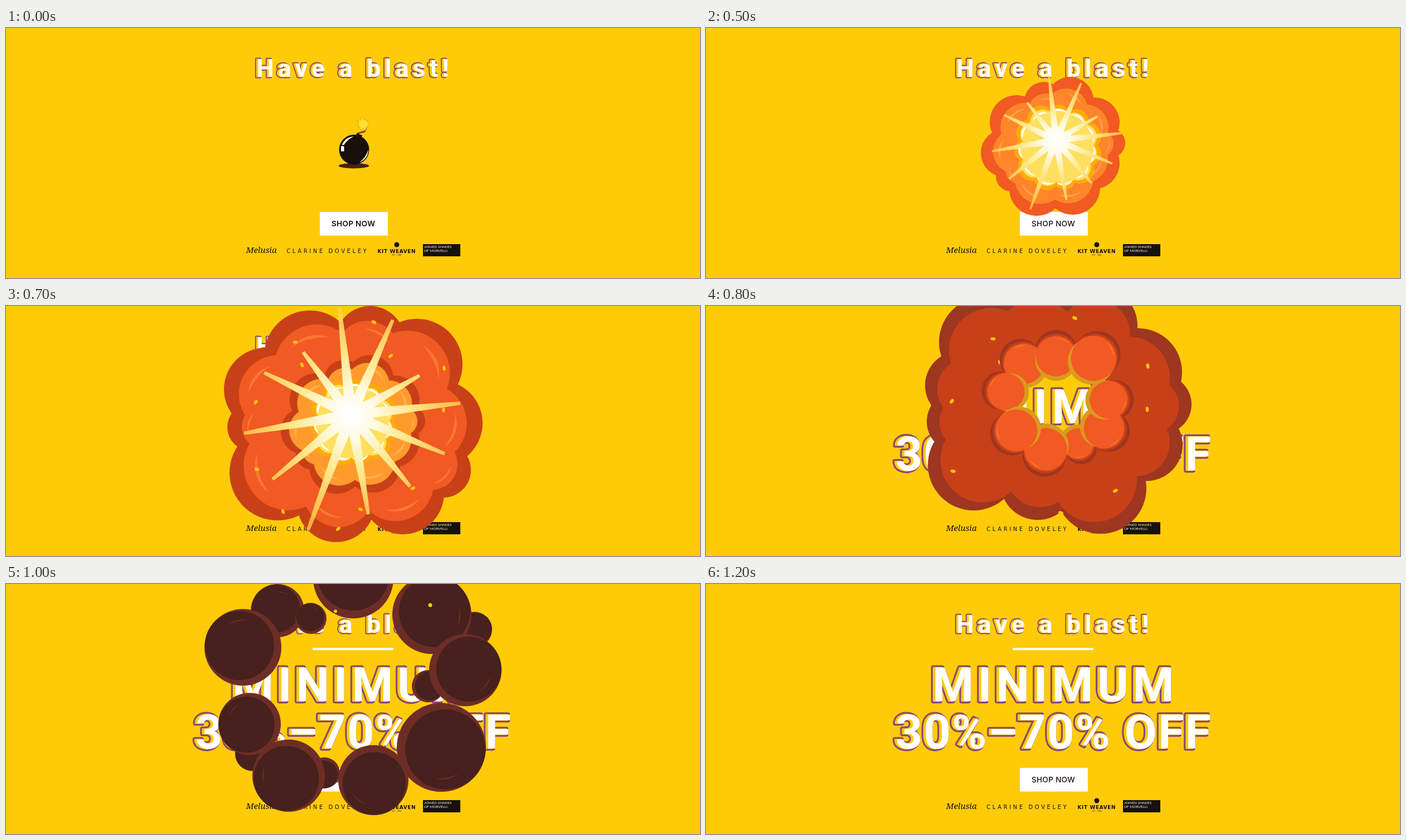
Animation, 1245 px wide and 450 px high, one loop 5200 ms. Source, as an HTML page with a canvas:

```html
<!DOCTYPE html>
<html lang="en">
<head>
<meta charset="utf-8">
<title>Have a blast!</title>
<style>
html, body { margin: 0; width: 100%; height: 100%; overflow: hidden; background: #ffcb08; }
canvas { display: block; }
</style>
</head>
<body>
<canvas id="stage" width="1245" height="450"></canvas>
<script>
const ctx = document.getElementById('stage').getContext('2d');
const YELLOW = '#ffcb08', INK = '#17100b', PURPLE = '#8b4a70';
const SOOT = '#46211d', BROWN = '#6d2d26', RUST = '#9e3620', RED = '#c84018';
const ORANGE = '#f15a22', AMBER = '#ff852a', GOLD = '#d99b1e';
const CX = 622, CY = 212, TAU = Math.PI * 2;

// Lobes as [x, y, radius]
const smallCloud = [
  [557, 169, 48], [606, 132, 35], [653, 130, 42], [697, 170, 45], [725, 207, 27],
  [695, 243, 47], [658, 287, 49], [593, 289, 49], [547, 267, 27], [536, 225, 43]];
const bigCloud = [
  [545, 90, 82], [653, 62, 62], [737, 105, 82], [778, 211, 77], [784, 295, 50],
  [712, 337, 74], [592, 355, 70], [487, 300, 86], [440, 218, 43], [466, 150, 75]];
const smokeCloud = [
  [500, 65, 82], [455, 143, 62], [450, 208, 54], [480, 286, 82], [595, 318, 67], [708, 328, 82],
  [790, 250, 65], [818, 177, 53], [775, 119, 79], [705, 35, 69], [590, 55, 90]];
const fireRing = [
  [557, 88, 50], [628, 72, 50], [677, 265, 38], [735, 232, 50], [712, 75, 56],
  [745, 168, 47], [517, 150, 46], [605, 278, 53], [540, 236, 52]];
const puffs = [
  [487, 48, 48], [425, 114, 69], [547, 62, 28], [623, -10, 72], [840, 82, 32], [764, 55, 71],
  [757, 184, 29], [824, 155, 65], [781, 294, 80], [659, 353, 63], [571, 340, 28],
  [443, 305, 32], [507, 345, 65], [437, 252, 56]];
const rays = [
  [-21, -194], [75, -171], [196, -21], [-192, 33], [-77, 207], [31, 179],
  [106, 129], [-156, -76], [-86, -113], [123, -71], [168, 70], [-141, 116]];
const embers = [
  [519, 65], [531, 106], [448, 173], [450, 294], [497, 370], [596, 401],
  [636, 366], [786, 112], [690, 90], [660, 29], [785, 187], [730, 328]];

function ellipse(x, y, rx, ry, color, turn = 0) {
  ctx.fillStyle = color;
  ctx.beginPath();
  ctx.ellipse(x, y, rx, ry, turn, 0, TAU);
  ctx.fill();
}
const disc = (x, y, r, color) => ellipse(x, y, r, r, color);

function crescent(x, y, r, angle, spread, color) {
  const at = (a, d) => [x + Math.cos(a) * d, y + Math.sin(a) * d];
  ctx.fillStyle = color;
  ctx.beginPath();
  ctx.arc(x, y, r, angle - spread, angle + spread);
  ctx.quadraticCurveTo(...at(angle, r), ...at(angle - spread, r));
  ctx.fill();
}

function scaled(k, x, y, draw) {
  ctx.save();
  ctx.translate(x, y);
  ctx.scale(k, k);
  ctx.translate(-x, -y);
  draw();
  ctx.restore();
}

function label(text, x, y, font, color, spacing = 0, align = 'center') {
  ctx.font = font;
  ctx.letterSpacing = spacing + 'px';
  ctx.textAlign = align;
  ctx.fillStyle = color;
  ctx.fillText(text, x + (align === 'center' ? spacing / 2 : 0), y);
}

// White lettering over an outlined copy set to its left
function headline(text, x, y, size, spacing, shift, outer, inner) {
  const font = `700 ${size}px Roboto, sans-serif`;
  label(text, x, y, font, YELLOW, spacing);
  ctx.lineJoin = 'round';
  for (const [color, width] of [[PURPLE, outer], [YELLOW, inner]]) {
    ctx.strokeStyle = color;
    ctx.lineWidth = width;
    ctx.strokeText(text, x + spacing / 2 - shift, y);
  }
  label(text, x - shift, y, font, YELLOW, spacing);
  label(text, x, y, font, '#fff', spacing);
}

function page(frame) {
  ctx.fillStyle = YELLOW;
  ctx.fillRect(0, 0, 1245, 450);
  headline('Have a blast!', 622, 88, 44, 7.5, 3, 5, 1.2);
  ctx.fillStyle = '#fff';
  ctx.fillRect(563, 331, 122, 42.5);
  if (frame > 7) {
    ctx.fillRect(550, 115, 145, 4);
    headline('MINIMUM', 623, 211, 84.5, 7.8, 4, 8, 1.5);
    headline('30%–70% OFF', 623, 296, 84.5, 2.2, 4, 8, 1.5);
  }
  label('SHOP NOW', 623, 357, `${frame ? 500 : 600} 13.6px Inter, sans-serif`, INK, 0.3);
  label('Melusia', 458, 405, 'italic 15px "Noto Serif", serif', INK);
  label('CLARINE DOVELEY', 575, 405, '10px "DejaVu Sans", sans-serif', INK, 3.6);
  disc(701, 390, 4.5, INK);
  label('KIT WEAVEN', 700.5, 404.5, 'bold 9px "DejaVu Sans", sans-serif', INK, 0.6);
  label('EST · 1984', 701, 410, '3px Inter, sans-serif', INK, 0.2);
  ctx.fillStyle = INK;
  ctx.fillRect(748, 389, 67, 22);
  label('JOINED SHADES', 750, 396, '6.4px Lato, sans-serif', '#fff', 0, 'left');
  label('OF MORVELLI.', 750, 402.5, '6.4px Lato, sans-serif', '#fff', 0, 'left');
}

function star(x, y, r, turn, color) {
  ctx.fillStyle = color;
  ctx.beginPath();
  for (let i = 0; i < 20; i++) {
    const a = turn + i * TAU / 20, d = r * (i % 2 ? 0.6 : 0.84 + 0.16 * Math.sin(i * 2.3));
    ctx.lineTo(x + Math.cos(a) * d, y + Math.sin(a) * d);
  }
  ctx.fill();
}

function bomb(frame) {
  const sx = 641 + frame * 0.7, sy = 173 + frame * 3.7;
  ellipse(624, 248, 27.5, 4.7, SOOT);
  ctx.lineWidth = 3;
  ctx.strokeStyle = '#76502f';
  ctx.beginPath();
  ctx.moveTo(629, 194);
  ctx.bezierCurveTo(630, 184, sx + 6, 192, sx + 4, sy + 7);
  ctx.stroke();
  disc(624.5, 219, 27, INK);
  ctx.save();
  ctx.translate(633, 195);
  ctx.rotate(0.4);
  ctx.fillRect(-5, -4, 10, 9);
  ctx.restore();
  crescent(625, 219, 24, 3.85, 0.82, '#fff');
  ctx.fillStyle = '#fff';
  ctx.fillRect(601, 213, 5.5, 9);
  ctx.fillStyle = INK;
  ctx.fillRect(600, 210.5, 9, 2);
  crescent(625, 219, 25, 0.6, 0.6, '#fff');
  star(sx, sy, 15, frame * 1.3, '#ff9d1e');
  star(sx, sy, 13, frame * 1.3 + 0.05, '#ffe12f');
}

function cloud(lobes, core, dark, light, glow, shift) {
  disc(CX, CY, core, dark);
  for (const [x, y, r] of lobes) disc(x, y, r, dark);
  disc(CX, CY, core, light);
  const inner = lobes.map(([x, y, r]) => {
    const a = Math.atan2(y - CY, x - CX);
    return [x - Math.cos(a) * shift, y - Math.sin(a) * shift, r * 0.93, a];
  });
  for (const [x, y, r] of inner) disc(x, y, r, light);
  if (glow) for (const [x, y, r, a] of inner) crescent(x, y, r * 0.75, a + 0.3, 0.65, glow);
}

function core(x, y) {
  const ring = (radius, r, color) => {
    disc(x, y, radius + 5, color);
    for (let i = 0; i < 11; i++) {
      const a = i * TAU / 11 + 0.2;
      disc(x + Math.cos(a) * radius, y + Math.sin(a) * radius, r + 3 * Math.sin(i * 2.1), color);
    }
  };
  ring(57, 23, '#ffab08');
  ring(51, 21, '#ffdf5e');
  for (let i = 0; i < 11; i++) {
    const a = i * TAU / 11 + 0.2;
    crescent(x + Math.cos(a) * 51, y + Math.sin(a) * 51, 19, a, 0.95, '#fff');
  }
}

function flare(x, y, k) {
  const glow = ctx.createRadialGradient(x, y, 0, x, y, 210 * k);
  glow.addColorStop(0, '#fff');
  glow.addColorStop(0.2, '#fffbe8');
  glow.addColorStop(0.5, '#ffe88c');
  glow.addColorStop(1, 'rgba(255, 205, 70, .8)');
  ctx.fillStyle = glow;
  for (const [dx, dy] of rays) {
    const length = Math.hypot(dx, dy), nx = -dy / length, ny = dx / length;
    const tipX = x + dx * k, tipY = y + dy * k, base = 10 * k + 1, tip = 3 * k;
    ctx.beginPath();
    ctx.moveTo(x + nx * base, y + ny * base);
    ctx.lineTo(tipX + nx * tip, tipY + ny * tip);
    ctx.lineTo(tipX - nx * tip, tipY - ny * tip);
    ctx.lineTo(x - nx * base, y - ny * base);
    ctx.fill();
  }
  disc(x, y, 15 * k, '#fff');
}

function sparks() {
  embers.forEach(([x, y], i) => ellipse(x, y, 4.5, 2.8, '#ffc20e', i * 1.1));
}

function fireball() {
  cloud(smallCloud, 85, ORANGE, AMBER, '#ffa04d', 19);
  core(630, 215);
  flare(628, 202, 0.6);
}

function blast(k, dark, light) {
  scaled(k, CX, CY, () => {
    cloud(bigCloud, 140, dark, light, '#fb7634', 23);
    sparks();
    cloud(smallCloud, 85, dark, '#ff9b2d', '#ffb35c', 12);
    core(622, 210);
    flare(619, 196, 1);
  });
}

// Smoke with a burning ring that opens onto the page behind it
function burningRing(frame, k, dark, light) {
  cloud(smokeCloud, 140, dark, light, null, 19);
  scaled(1.04, CX, CY, sparks);
  const hx = 628, hy = 172;
  const lobes = fireRing.map(([x, y, r]) => {
    const a = Math.atan2(y - hy, x - hx);
    return [x, y, r, Math.cos(a), Math.sin(a)];
  });
  const layer = (out, color) => {
    for (const [x, y, r, c, s] of lobes) disc(x + c * out, y + s * out, r, color);
  };
  scaled(k, hx, hy, () => {
    layer(22, RUST);
    layer(13, RED);
  });
  ctx.save();
  ctx.beginPath();
  ctx.ellipse(hx, hy, 95 * k, 80 * k, 0, 0, TAU);
  ctx.clip();
  page(frame);
  ctx.restore();
  scaled(k, hx, hy, () => {
    for (const [x, y, r, c, s] of lobes) {
      disc(x, y, r, GOLD);
      disc(x + c * 9, y + s * 9, r * 0.97, ORANGE);
      crescent(x + c * 9, y + s * 9, r * 0.88, Math.atan2(s, c) + 0.4, 0.4, AMBER);
    }
  });
}

function smokePuffs(spread, size) {
  for (const [px, py, pr] of puffs) {
    const x = CX + (px - CX) * spread, y = CY + (py - CY) * spread, r = pr * size;
    const a = Math.atan2(y - CY, x - CX), c = Math.cos(a), s = Math.sin(a);
    disc(x, y, r, BROWN);
    disc(x + c * r * 0.1, y + s * r * 0.1, r * 0.9, SOOT);
    crescent(x, y, r * 0.72, a + 0.9, 0.4, BROWN);
  }
}

const scenes = {
  4: () => scaled(0.45, 625, 208, fireball),
  5: fireball,
  6: () => blast(0.805, '#dc4d1d', '#f66a28'),
  7: () => blast(1, RED, ORANGE),
  8: () => burningRing(8, 0.75, RUST, RED),
  9: () => burningRing(9, 1, SOOT, BROWN),
  10: () => {
    smokePuffs(1, 1);
    disc(761, 38, 3.5, YELLOW);
    disc(591, 49, 3, YELLOW);
  },
  11: () => smokePuffs(1.07, 0.5)
};

function draw() {
  const frame = Math.min(12, Math.floor(performance.now() % 5200 / 100));
  page(frame);
  if (frame < 4) bomb(frame);
  else if (scenes[frame]) scenes[frame]();
  requestAnimationFrame(draw);
}
draw();
</script>
</body>
</html>
```
